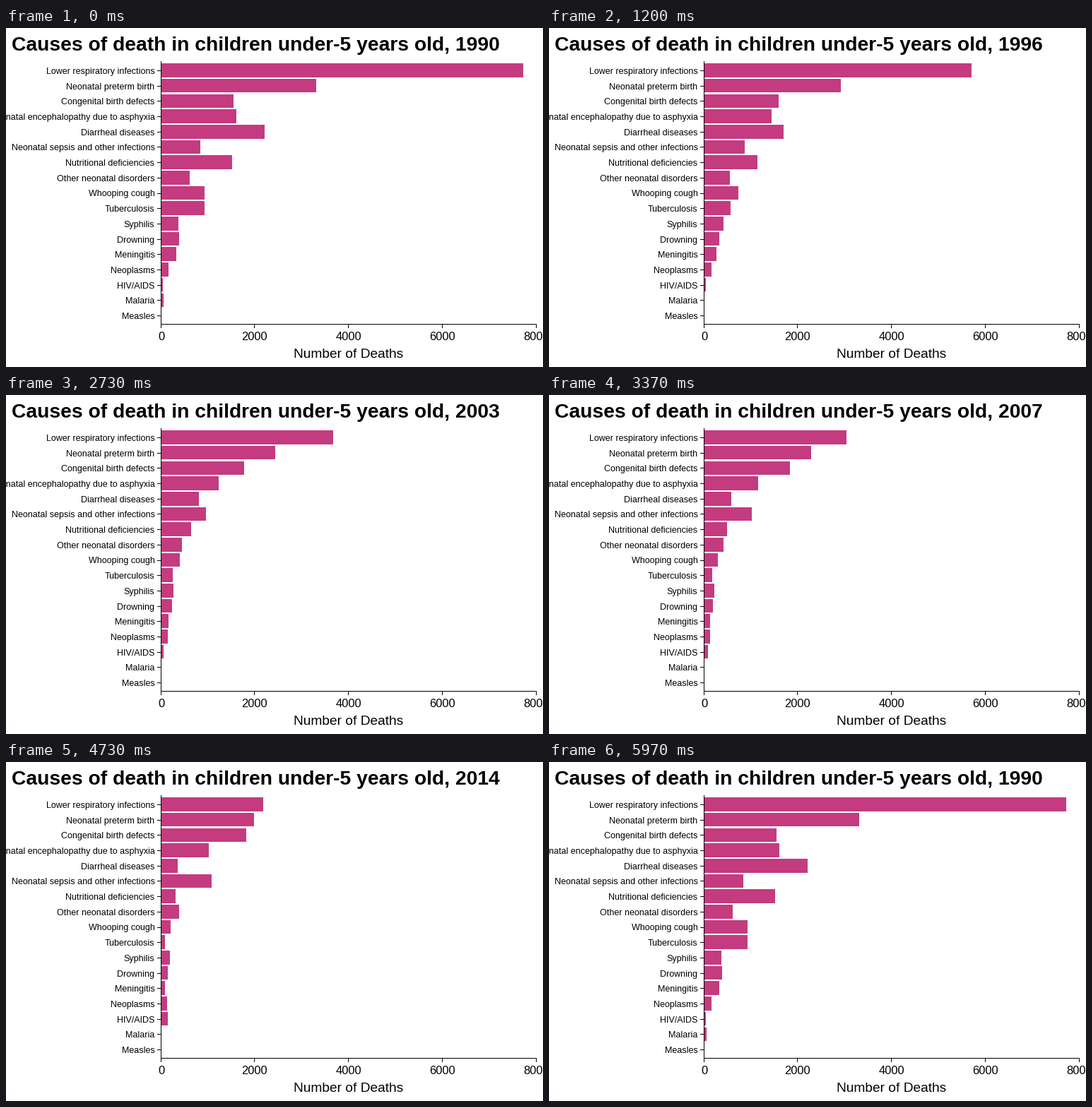
Animation, 760 px wide and 480 px high, one loop 6000 ms. Source, as a matplotlib script:

```python
import numpy as np
import matplotlib.pyplot as plt
from matplotlib.animation import FuncAnimation
from matplotlib.patches import Rectangle

W, H, DPI = 760, 480, 100
LOOP, STEP = 6000, 20
FIRST_YEAR, YEARS = 1990, 30
X0, TOP, BASE = 219, 47, 419
SCALE = 531 / 8000
PINK = "#c43b80"

plt.rcParams["font.family"] = "Liberation Sans"

# Deaths per cause at a few points in time (years since 1990)
KNOTS = np.array([0, 3, 9, 13.5, 20.75, 26.5, 29])
CAUSES = {
    "Lower respiratory infections": (7722, 6652, 4844, 3669, 2539, 1876, 1590),
    "Neonatal preterm birth": (3307, 3126, 2705, 2433, 2132, 1816, 1630),
    "Congenital birth defects": (1544, 1559, 1650, 1770, 1846, 1740, 1610),
    "Neonatal encephalopathy due to asphyxia": (1605, 1514, 1364, 1228, 1092, 942, 860),
    "Diarrheal diseases": (2207, 2072, 1258, 806, 414, 309, 270),
    "Neonatal sepsis and other infections": (836, 836, 896, 957, 1077, 1047, 1000),
    "Nutritional deficiencies": (1514, 1318, 942, 640, 369, 264, 235),
    "Other neonatal disorders": (610, 580, 520, 444, 399, 354, 325),
    "Whooping cough": (927, 866, 565, 399, 218, 203, 190),
    "Tuberculosis": (927, 731, 429, 249, 113, 68, 55),
    "Syphilis": (369, 429, 369, 264, 203, 188, 175),
    "Drowning": (384, 354, 294, 234, 158, 128, 113),
    "Meningitis": (324, 294, 218, 158, 113, 53, 45),
    "Neoplasms": (158, 158, 158, 143, 128, 128, 120),
    "HIV/AIDS": (38, 38, 38, 53, 128, 158, 158),
    "Malaria": (53, 23, 0, 0, 0, 0, 0),
    "Measles": (0,) * 7,
}


def hermite(x, knots, vals):
    """Smooth curve through the knots, evaluated at x."""
    slope = np.gradient(vals, knots)
    i = np.clip(np.searchsorted(knots, x, side="right") - 1, 0, len(knots) - 2)
    h = knots[i + 1] - knots[i]
    u = (x - knots[i]) / h
    return ((1 + 2 * u) * (1 - u) ** 2 * vals[i] + u * (1 - u) ** 2 * h * slope[i]
            + u * u * (3 - 2 * u) * vals[i + 1] + u * u * (u - 1) * h * slope[i + 1])


years = np.arange(YEARS)
deaths = np.array([np.maximum(0, hermite(years, KNOTS, np.array(v, float)))
                   for v in CAUSES.values()])

# Each year rests for three ticks, then moves on over three more
timeline = []
for y in years:
    rest = 2 if y in (0, 15) else 3
    move = 4 if y == 0 else 3
    timeline += [(y, 0.0)] * rest
    timeline += [(y, n / (move + 1)) for n in range(1, move + 1)]
timeline.append((0, 0.0))

fig = plt.figure(figsize=(W / DPI, H / DPI), dpi=DPI, facecolor="white")
ax = fig.add_axes([0, 0, 1, 1])
ax.set_xlim(0, W)
ax.set_ylim(H, 0)
ax.axis("off")


def box(x, y, w, h, color="black", z=2):
    return ax.add_patch(Rectangle((x, y), w, h, facecolor=color, linewidth=0,
                                  antialiased=False, zorder=z))


def label(x, y, text, px, ha="left", weight="normal"):
    return ax.text(x, y, text, fontsize=px * 72 / DPI, ha=ha, va="baseline",
                   color="black", weight=weight)


pitch = (BASE + 1 - TOP) / (len(CAUSES) + 0.2)
bars = []
for i, name in enumerate(CAUSES):
    mid = TOP + pitch * (i + 0.6)
    top, bottom = round(mid - 0.45 * pitch), round(mid + 0.45 * pitch)
    bars.append(box(X0 + 1, top, 0, bottom - top, PINK, 1))
    box(X0 - 5, round(mid), 5, 1)
    label(210.5, round(mid + 5), name, 12.5, "right")

box(X0, TOP, 1, BASE + 1 - TOP)
box(X0, BASE, 532, 1)
for value in range(0, 8001, 2000):
    x = int(X0 + value * SCALE)
    box(x, BASE + 1, 1, 5)
    label(x + 0.5, 442, str(value), 16.5, "center")

label(484.5, 467, "Number of Deaths", 19.15, "center")
title = label(8, 32, "", 28.25, weight="bold")


def update(frame):
    t = frame * STEP + STEP / 2
    year, u = timeline[int((t + 3.5) * 3 / 100)]
    after = (year + 1) % YEARS
    now = deaths[:, year] * (1 - u) + deaths[:, after] * u
    for bar, v in zip(bars, now):
        bar.set_width(int(v * SCALE))
    shown = FIRST_YEAR + (year if u <= 0.5 else after)
    title.set_text(f"Causes of death in children under-5 years old, {shown}")
    return [*bars, title]


anim = FuncAnimation(fig, update, frames=LOOP // STEP, interval=STEP,
                     repeat=True, repeat_delay=0, blit=False)
plt.show()
```
